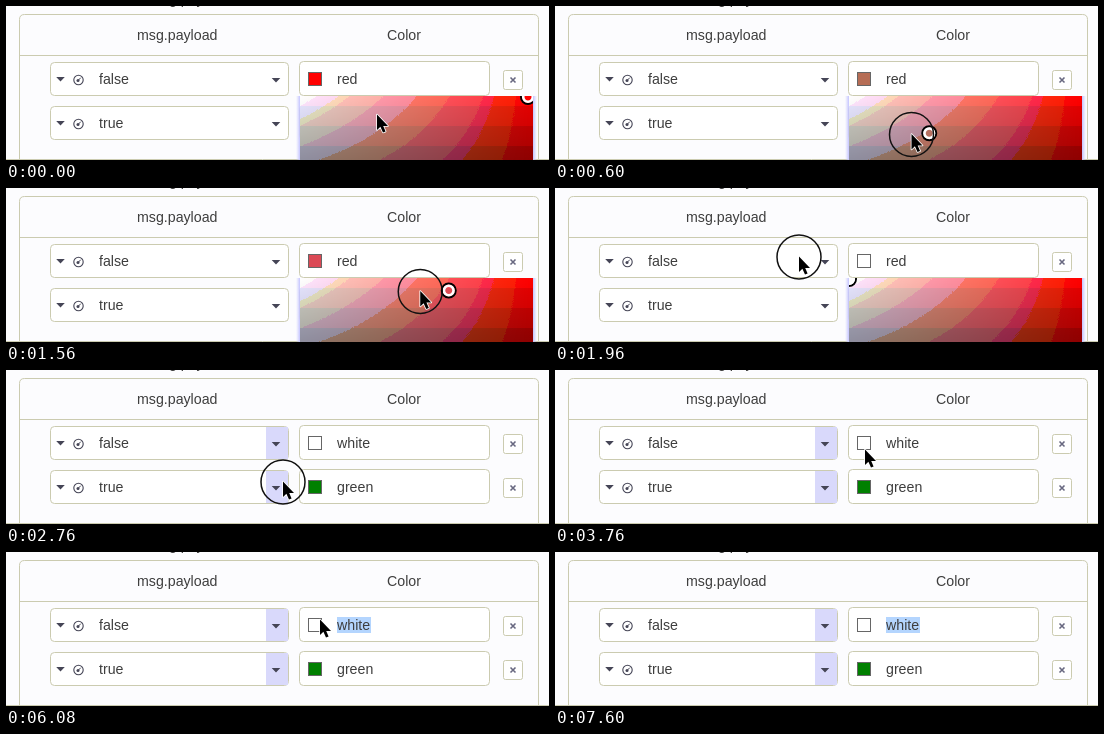
An HTML page for the animation above (8000 ms loop, 543 by 154 pixels).

```html
<!DOCTYPE html>
<html lang="en">
<head>
<meta charset="utf-8">
<title>Color picker</title>
<style>
html, body { margin: 0; width: 100%; height: 100%; overflow: hidden; background: #fcfcfe; }
svg { display: block; }
text { font: 14.2px "Liberation Sans", Arial, sans-serif; fill: #3e3e3e; }
.line { fill: none; stroke: #cbcbb0; }
.box { fill: #fff; stroke: #cbcbb0; }
.mark { fill: #454556; }
.hover { fill: #d9d9fb; }
</style>
</head>
<body>
<svg width="543" height="154" viewBox="0 0 543 154">
  <defs>
    <linearGradient id="sat">
      <stop offset="0" stop-color="#fff"/>
      <stop offset="1" stop-color="#f00"/>
    </linearGradient>
    <linearGradient id="val" x2="0" y2="1">
      <stop offset="0" stop-color="#000" stop-opacity="0"/>
      <stop offset="1" stop-color="#000"/>
    </linearGradient>
    <linearGradient id="edge">
      <stop offset="0" stop-color="#ccf" stop-opacity="0"/>
      <stop offset="1" stop-color="#c4c4ff"/>
    </linearGradient>
    <clipPath id="area"><rect x="294" y="90" width="233" height="64"/></clipPath>
    <filter id="bands" x="0" y="0" width="1" height="1" color-interpolation-filters="sRGB">
      <feComponentTransfer>
        <feFuncR id="bandR" type="discrete"/>
        <feFuncG id="bandG" type="discrete"/>
        <feFuncB id="bandB" type="discrete"/>
      </feComponentTransfer>
    </filter>
  </defs>

  <text x="144" y="-2">msg.payload</text>
  <path class="line" d="M13.5 154V13.5q0-5 5-5H527.5q5 0 5 5V154M13.5 49.5H532.5M0 153.5H543"/>
  <text x="131" y="34">msg.payload</text>
  <text x="381" y="34">Color</text>

  <g id="rows"></g>

  <g id="popup">
    <rect x="290" y="90" width="4" height="64" fill="url(#edge)"/>
    <rect x="-531" y="90" width="4" height="64" fill="url(#edge)" transform="scale(-1 1)"/>
    <g clip-path="url(#area)">
      <g id="shades">
        <rect x="294" y="90" width="233" height="140" fill="url(#sat)"/>
        <rect x="294" y="90" width="233" height="140" fill="url(#val)"/>
      </g>
      <use href="#shades" filter="url(#bands)" opacity=".65"/>
      <g id="handle" fill="none">
        <circle r="7" stroke="#000" stroke-width="2"/>
        <circle r="4.8" stroke="#fff" stroke-width="2.6"/>
      </g>
    </g>
  </g>

  <g id="pointer">
    <circle id="ring" r="22" fill="none" stroke="#111" stroke-width="1.5"/>
    <path d="M0-.5V15L3.4 11.8 6 17.5 8.6 16.4 6.2 11H11Z" fill="#000" stroke="#fff"
      stroke-width="1.6" stroke-linejoin="round" paint-order="stroke"/>
  </g>
</svg>

<script>
const $ = id => document.getElementById(id);
const LOOP = 8000, STEP = 40;
const PICK = 160, DROP = 2440, CLOSE = 2640, LAG = 80;
const LEVELS = [7, 7, 3]; // top step of the red, green and blue scales

// time, x, y of the pointer
const path = [
  [0, 371, 109], [160, 371, 111], [300, 395, 122], [440, 392, 126],
  [600, 356.5, 128.5], [760, 336, 120], [960, 430, 122], [1080, 504, 104],
  [1160, 506, 105.5], [1280, 514, 100], [1600, 400, 104], [1960, 244, 69],
  [2400, 244, 69], [2600, 277, 112], [3040, 277, 112], [3400, 326, 120],
  [3760, 310, 80], [3880, 310, 80], [4480, 369, 72], [4720, 369, 72],
  [4920, 321, 69], [5120, 314, 68]
];
const presses = [[PICK, DROP], [2600, 2840], [4720, 5560]];

function row(y, name, label, color) {
  const mid = y + 16.5;
  return `
    <rect class="box" x="44.5" y="${y - .5}" width="238" height="33" rx="4"/>
    <rect class="hover" id="${name}Hover" x="260" y="${y}" width="22" height="32"/>
    <path class="mark" d="M50.2 ${mid - 2.5}h8.6l-4.3 4.6zM265.7 ${mid - 1.5}h8.6l-4.3 4.6z"/>
    <circle cx="72.5" cy="${mid + .5}" r="4.7" fill="none" stroke="#454556" stroke-width="1.1"/>
    <circle class="mark" cx="72" cy="${mid + 1}" r="1.5"/>
    <path d="M72 ${mid + 1}l2.8-2.8" stroke="#454556"/>
    <text x="93" y="${y + 21}">${label}</text>
    <rect class="box" x="293.5" y="${y - 1.5}" width="190" height="34" rx="4"/>
    <rect id="${name}Sel" y="${y + 8}" height="16" width="0" fill="#b4d5fe"/>
    <rect id="${name}Swatch" x="302.5" y="${y + 9.5}" width="13" height="13" fill="${color}" stroke="#666"/>
    <text id="${name}Text" x="331" y="${y + 21}">${color}</text>
    <rect class="box" x="497.5" y="${y + 7.5}" width="19" height="19" rx="2"/>
    <path d="M504.5 ${mid - 2}l5 5m0-5l-5 5" stroke="#686880" stroke-width="1.6"/>`;
}
$('rows').innerHTML = row(57, 'first', 'false', 'red') + row(101, 'second', 'true', 'green');

// round each channel to the nearest level
LEVELS.forEach((n, i) => {
  const cells = Array.from({ length: 2 * n }, (_, k) => Math.ceil(k / 2) / n);
  $('band' + 'RGB'[i]).setAttribute('tableValues', cells.join(' '));
});

const clamp = (v, lo, hi) => Math.max(lo, Math.min(hi, v));
const show = (id, on) => $(id).setAttribute('visibility', on ? 'visible' : 'hidden');
const move = (id, x, y) => $(id).setAttribute('transform', `translate(${x} ${y})`);

function pointerAt(t) {
  const i = path.findIndex(p => p[0] > t);
  if (i < 0) return path[path.length - 1].slice(1);
  const [a, b] = [path[i - 1], path[i]];
  const k = (t - a[0]) / (b[0] - a[0]);
  return [a[1] + (b[1] - a[1]) * k, a[2] + (b[2] - a[2]) * k];
}

function handleAt(t) {
  if (t < PICK) return [522, 91];
  const [x, y] = pointerAt(clamp(t - LAG, PICK, DROP - LAG));
  return [clamp(x, 294, 522), clamp(y, 91, 154)];
}

function shade(x, y) {
  const v = 1 - (y - 91) / 140;
  const pale = v * (1 - (x - 294) / 228);
  const rgb = [v, pale, pale].map((c, i) => Math.round(255 * Math.round(c * LEVELS[i]) / LEVELS[i]));
  return `rgb(${rgb})`;
}

function draw(t) {
  const [x, y] = pointerAt(t);
  const [hx, hy] = handleAt(t);
  const closed = t >= CLOSE;
  move('pointer', x, y);
  show('pointer', t < 7600);
  show('ring', t < 7600 && presses.some(([a, b]) => t >= a && t < b));
  move('handle', hx, hy);
  show('popup', !closed);
  $('firstSwatch').setAttribute('fill', shade(hx, hy));
  $('firstText').textContent = closed ? 'white' : 'red';
  show('firstHover', t >= 2200);
  show('secondHover', closed);

  const left = t < 4720 ? 365 : clamp(x, 331, 365);
  $('firstSel').setAttribute('x', left);
  $('firstSel').setAttribute('width', 365 - left);
}

const start = performance.now();
function tick() {
  const t = (performance.now() - start) % LOOP;
  draw(Math.floor(t / STEP) * STEP);
  requestAnimationFrame(tick);
}
tick();
</script>
</body>
</html>
```
